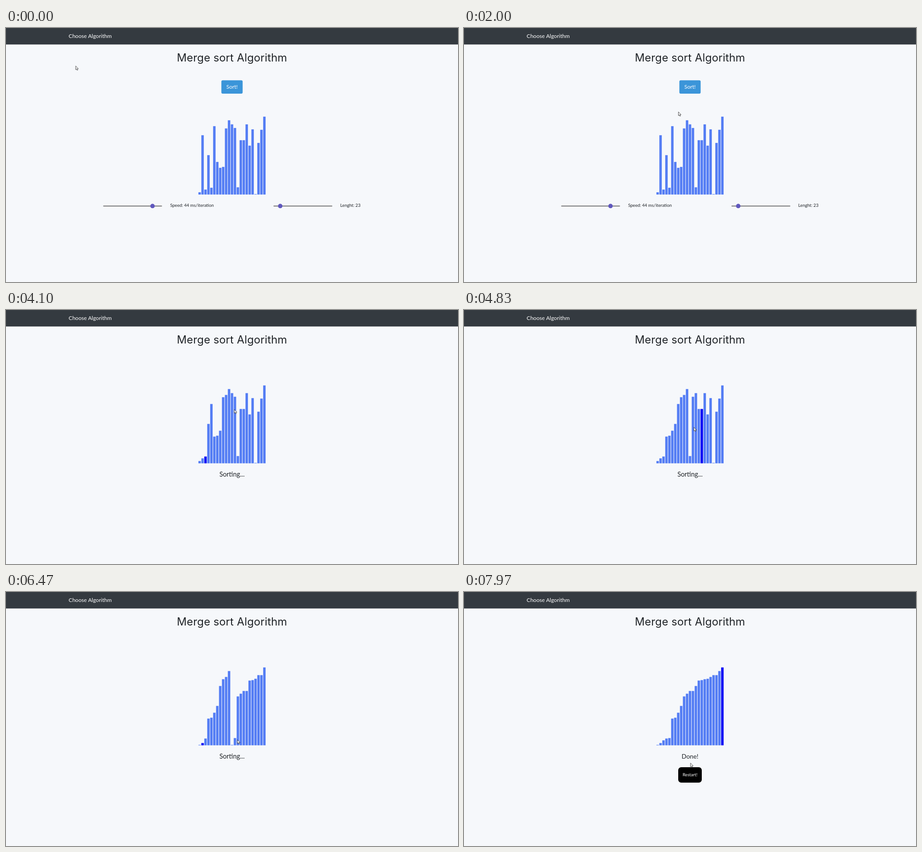
An HTML page that plays this animation: 998 by 561 pixels, repeating every 8 s.

```html
<!DOCTYPE html>
<html lang="en">
<head>
<meta charset="utf-8">
<title>Merge sort</title>
<style>
  html, body { margin: 0; width: 100%; height: 100%; overflow: hidden; background: #f6f8fb; }
  svg { display: block; width: 100vw; height: 100vh; }
  text { font-family: Lato, "Open Sans", sans-serif; fill: #1f2327; }
  .light { fill: #fff; }
  .title { font: 24px Inter, sans-serif; letter-spacing: .15px; }
  .label { font-size: 9.6px; }
  .mid { text-anchor: middle; }
  .track { fill: #767676; }
  .knob { fill: #6058bd; }
  #cursor { animation: wander 8s linear infinite; }
  @keyframes wander {
    0%, 11% { transform: translate(153.5px, 83.5px); }
    25% { transform: translate(473px, 185px); }
    33%, 37.9% { transform: translate(505px, 134px); }
    51.2% { transform: translate(503.5px, 219px); }
    69.6% { transform: translate(510.5px, 298px); }
    80.9% { transform: translate(510.5px, 326px); }
    99.6%, 100% { transform: translate(499.7px, 377.5px); }
  }
</style>
</head>
<body>
<svg viewBox="0 0 998 561">
  <rect width="998" height="561" fill="#f6f8fb"/>
  <rect width="998" height="36.4" fill="#343a40"/>
  <text class="light" x="138.3" y="22" font-size="12.1">Choose Algorithm</text>
  <text class="title mid" x="499" y="73.5">Merge sort Algorithm</text>

  <g id="setup">
    <rect x="475.5" y="115.5" width="47" height="29.5" rx="3" fill="#3b95d9"/>
    <text class="light mid" x="499" y="134.3" font-size="12">Sort!</text>
    <rect class="track" x="214.5" y="392.2" width="130" height="2" rx="1"/>
    <circle class="knob" cx="323.5" cy="393.2" r="4.9"/>
    <text class="label" x="362.4" y="394.6">Speed: 44 ms/iteration</text>
    <rect class="track" x="590.5" y="392.2" width="130" height="2" rx="1"/>
    <circle class="knob" cx="605.5" cy="393.2" r="4.9"/>
    <text class="label" x="738" y="394.6">Lenght: 23</text>
  </g>

  <g id="bars"></g>
  <text id="sorting" class="mid" x="499" y="368" font-size="14.4">Sorting...</text>
  <g id="done">
    <text class="mid" x="499" y="368" font-size="13.8">Done!</text>
    <rect x="473" y="387" width="52" height="34" rx="6.5"/>
    <text class="label light mid" x="499" y="407.3">Restart!</text>
  </g>
  <path id="cursor" d="M.4 .4V8.6L2.3 7L3.6 9.8L5 9.2L3.8 6.4H6.2Z" fill="#fff" stroke="#222" stroke-width=".8"/>
</svg>
<script>
const LOOP = 8000, FPS = 30, SORT_START = 2701, STEP = 44;
const PITCH = 6.5, BAR_WIDTH = 5.4, CENTER = 499;

// The unsorted input; every later arrangement follows from the sort.
const input = [5, 131, 11, 87, 15, 151, 72, 59, 61, 146, 164, 155,
  147, 16, 120, 120, 155, 108, 144, 1, 114, 143, 172];

// Every write of the merge sort becomes one step.
function recordSort(source) {
  const values = [...source];
  const steps = [{ values: [...values], active: -1 }];
  const sort = (start, end) => {
    if (end - start < 2) return;
    const middle = start + Math.floor((end - start) / 2);
    sort(start, middle);
    sort(middle, end);
    const left = values.slice(start, middle), right = values.slice(middle, end);
    for (let i = start; i < end; i++) {
      const takeLeft = left.length && (!right.length || left[0] <= right[0]);
      values[i] = (takeLeft ? left : right).shift();
      steps.push({ values: [...values], active: i });
    }
  };
  sort(0, values.length);
  return steps;
}

const steps = recordSort(input);
const doneAt = SORT_START + STEP * steps.length;
const byId = id => document.getElementById(id);
const show = (id, visible) => { byId(id).style.display = visible ? '' : 'none'; };

const bars = input.map((_, i) => {
  const bar = document.createElementNS('http://www.w3.org/2000/svg', 'rect');
  bar.setAttribute('x', CENTER + (i - (input.length - 1) / 2) * PITCH - BAR_WIDTH / 2);
  bar.setAttribute('width', BAR_WIDTH);
  return byId('bars').appendChild(bar);
});

function draw(time) {
  const started = time >= SORT_START, finished = time >= doneAt;
  const index = Math.floor((time - SORT_START) / STEP);
  const { values, active } = steps[Math.max(0, Math.min(steps.length - 1, index))];
  const base = started ? 338.6 : 367.8;
  bars.forEach((bar, i) => {
    bar.setAttribute('y', base - values[i]);
    bar.setAttribute('height', values[i]);
    bar.setAttribute('fill', i === active ? '#0000f5' : '#547df4');
  });
  show('setup', !started);
  show('sorting', started && !finished);
  show('done', finished);
}

const origin = performance.now();
function tick() {
  const elapsed = (performance.now() - origin) % LOOP;
  const frame = Math.floor((elapsed + 4) * FPS / 1000) % (LOOP * FPS / 1000);
  draw(frame * 1000 / FPS);
  requestAnimationFrame(tick);
}
tick();
</script>
</body>
</html>
```
